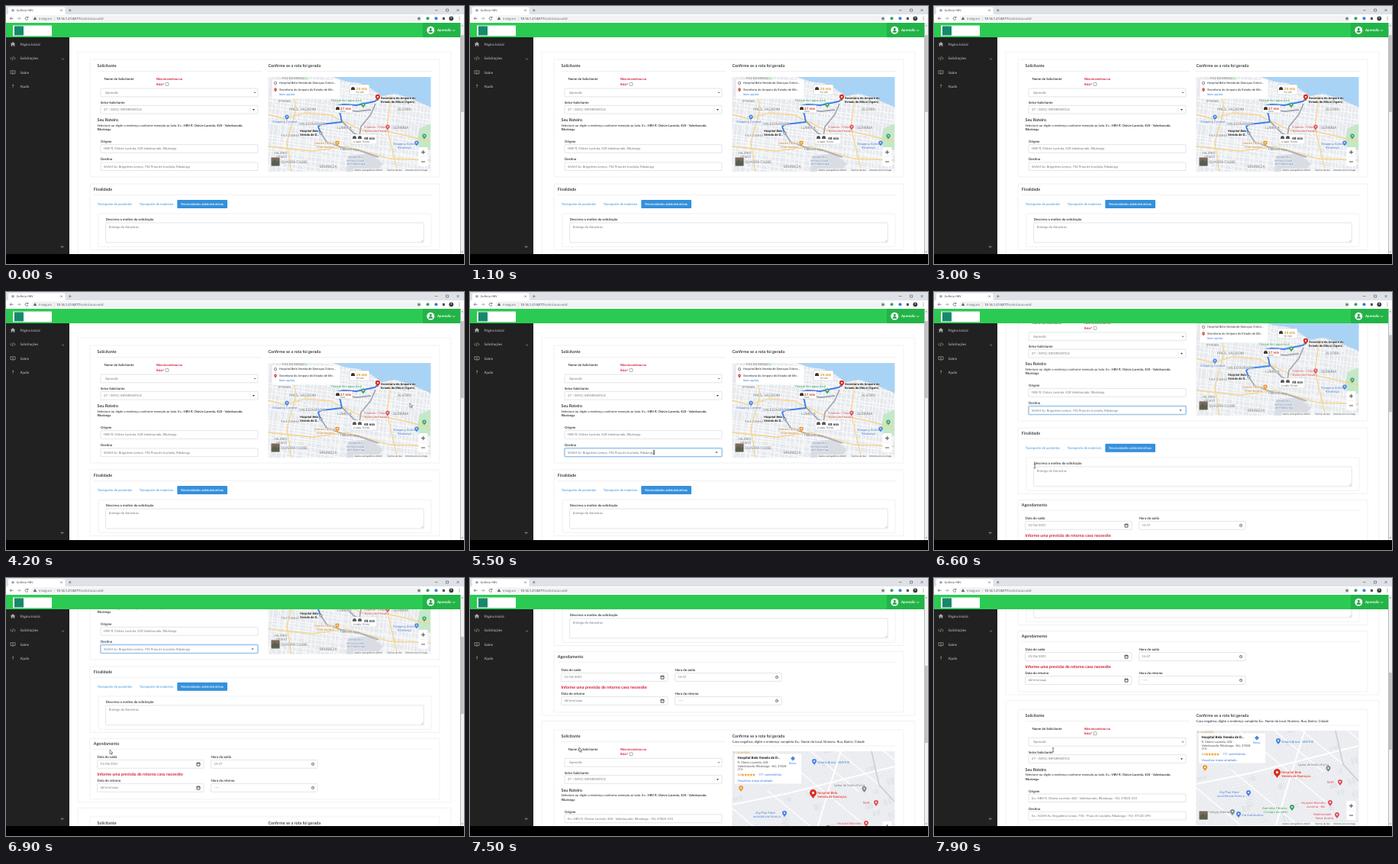
Write an HTML page that moves like this. It is 600 by 338 pixels and loops after 8 s.

```html
<!DOCTYPE html>
<html lang="pt-BR">
<head>
<meta charset="utf-8">
<title>Solicitação</title>
<style>
html, body { margin: 0; width: 100%; height: 100%; overflow: hidden; background: #000; }
#stage { display: block; width: 100vw; height: 100vh; }
text { font-family: Lato, "Open Sans", sans-serif; text-rendering: geometricPrecision; white-space: pre; }
.ui text { font-family: "Open Sans", Roboto, sans-serif; }
.map text { font-family: Roboto, Inter, sans-serif; }
.halo text { paint-order: stroke; stroke: #fff; stroke-width: .7px; stroke-linejoin: round; }

#page { animation: scroll 8s linear infinite; }
#thumb { animation: thumb 8s linear infinite; }
#pointer { animation: move 8s ease-in-out infinite; }
#arrow { animation: arrow 8s step-end infinite; }
#beam { animation: beam 8s step-end infinite; }
#focus { animation: focus 8s step-end infinite; }
#caret { animation: blink 1s step-end infinite; }

@keyframes scroll {
  0%, 78.75% { transform: translateY(0); }
  82.5% { transform: translateY(-55px); }
  86.25% { transform: translateY(-117px); }
  93.75% { transform: translateY(-231px); }
  96.25% { transform: translateY(-250px); }
  98.75%, 100% { transform: translateY(-258px); }
}
@keyframes thumb {
  0%, 78.75% { transform: translateY(0); }
  82.5% { transform: translateY(18.3px); }
  86.25% { transform: translateY(39px); }
  93.75% { transform: translateY(77px); }
  96.25% { transform: translateY(83.3px); }
  98.75%, 100% { transform: translateY(86px); }
}
@keyframes move {
  0%, 50% { transform: translate(598px, 130px); }
  58% { transform: translate(262px, 205px); }
  63%, 70% { transform: translate(241px, 210px); }
  78%, 82.5% { transform: translate(132px, 228px); }
  86.25% { transform: translate(136px, 225px); }
  93.75% { transform: translate(143px, 222px); }
  98.75%, 100% { transform: translate(156px, 225px); }
}
@keyframes arrow { 0% { opacity: 0; } 50% { opacity: 1; } 58% { opacity: 0; } 84% { opacity: 1; } 96.25%, 100% { opacity: 0; } }
@keyframes beam { 0% { opacity: 0; } 58% { opacity: 1; } 84% { opacity: 0; } 96.25%, 100% { opacity: 1; } }
@keyframes focus { 0% { opacity: 0; } 63.75%, 100% { opacity: 1; } }
@keyframes blink { 0% { opacity: 0; } 10% { opacity: 1; } 60%, 100% { opacity: 0; } }
</style>
</head>
<body>
<svg id="stage" viewBox="0 0 600 338" preserveAspectRatio="none"></svg>
<script>
const INK = '#24272b', GREY = '#75797f', BLUE = '#3490dc', RED = '#d0142c', LINE = '#e6e7e9';

// y is the vertical middle of the lowercase letters
const text = (x, y, s, size = 4.3, fill = INK, weight = 400, more = '') =>
  `<text x="${x}" y="${y + size * .33}" font-size="${size}" fill="${fill}" font-weight="${weight}" ${more}>${s}</text>`;
const label = (x, y, s) => text(x, y, s, 4.35, INK, 600);
const title = (x, y, s) => text(x, y, s, 5.4, INK, 600);
const rect = (x, y, w, h, fill, more = '') =>
  `<rect x="${x}" y="${y}" width="${w}" height="${h}" fill="${fill}" ${more}/>`;
const box = (x, y, w, h, color = LINE, r = 1) =>
  rect(x, y, w, h, '#fff', `stroke="${color}" stroke-width=".6" rx="${r}"`);
const line = (d, color, width = .6, more = '') =>
  `<path d="${d}" fill="none" stroke="${color}" stroke-width="${width}" ${more}/>`;
const shape = (d, fill) => `<path d="${d}" fill="${fill}"/>`;
const dot = (x, y, r, fill) => `<circle cx="${x}" cy="${y}" r="${r}" fill="${fill}"/>`;
const hr = (x1, x2, y) => line(`M${x1} ${y}H${x2}`, '#e2e3e5', .5);
const chevron = (x, y, color, s = 1.4) => line(`M${x - s} ${y - s / 2}l${s} ${s}l${s} ${-s}`, color, .8);
const caretDown = (x, y) => shape(`M${x - 1.6} ${y - .8}h3.2l-1.6 1.9z`, '#444');
const input = (x, y, w, s, h = 10.8) =>
  box(x, y, w, h, '#cfd3d8') + text(x + 4, y + 5.4, s, 4.2, GREY);

function rng(seed) {
  return () => (seed = (seed * 16807) % 2147483647) / 2147483647;
}

// Roughly parallel streets crossing a region, turned by an angle
function streets(cx, cy, reach, gap, angle, seed, color, width) {
  const rnd = rng(seed);
  let d = '';
  for (let v = -reach; v < reach; v += gap * (.6 + rnd() * .8)) {
    const a = -reach * (.3 + rnd() * .9), b = reach * (.3 + rnd() * .9);
    d += `M${a.toFixed(1)} ${v.toFixed(1)}L${b.toFixed(1)} ${(v + rnd() * 4 - 2).toFixed(1)}`;
  }
  return line(d, color, width, `transform="translate(${cx} ${cy}) rotate(${angle})"`);
}
const pin = (x, y, color, s = 1) =>
  shape(`M${x} ${y + 4 * s}C${x - s} ${y + 2 * s} ${x - 3 * s} ${y + s} ${x - 3 * s} ${y - s}a${3 * s} ${3 * s} 0 0 1 ${6 * s} 0C${x + 3 * s} ${y + s} ${x + s} ${y + 2 * s} ${x} ${y + 4 * s}z`, color) +
  dot(x, y - s, s, '#fff');
const notes = list => `<g class="halo">${list.map(n => text(...n)).join('')}</g>`;

function mapFrame(y, top, body) {
  const controls =
    rect(347, top + 105, 12, 12, '#7d6a5c', 'stroke="#fff" stroke-width=".7" rx="1"') +
    shape(`M348 ${top + 112}l4-4 3 3 3-2v7h-10z`, '#56604f') +
    rect(540.5, top + 92, 12, 25, '#fff', 'rx="1"') +
    line(`M544 ${top + 98.5}h5m-2.5-2.5v5M544 ${top + 111}h5`, '#555', 1) +
    line(`M542 ${top + 104.5}h9`, '#ddd', .4) +
    rect(455, top + 120, 101, 4, '#f6f7f8') +
    text(456.5, top + 122, 'Dados cartográficos ©2021', 3, '#444') +
    text(499, top + 122, 'Termos de Uso', 3, '#444') +
    text(523, top + 122, 'Informe erro no mapa', 3, '#444');
  return `<svg class="map" x="343.5" y="${y}" width="213" height="124" viewBox="343.5 ${top} 213 124">${body}${controls}</svg>`;
}

function routeMap() {
  const road = '#f6d58b', mid = '#6b7076', alt = '#a5a9b0';
  const chip = (x, y, w, h) => rect(x, y, w, h, '#fff', 'stroke="#bbb" stroke-width=".4" rx="1"');
  const car = (x, y, c) => shape(`M${x} ${y + 3}v-1.6l.9-2.2h3.2l.9 2.2v1.6z`, c);
  return mapFrame(93, 93,
    rect(343, 93, 214, 125, '#e6e9ed') +
    streets(450, 155, 130, 5, 8, 11, '#fff', .8) +
    streets(450, 155, 130, 5, 96, 23, '#fff', .8) +
    streets(450, 155, 130, 13, 48, 37, '#fbfbfc', .9) +
    shape('M542 160l14-6v34l-12 4-6-14z', '#c5e8c9') + shape('M378 93h16l4 6-14 4z', '#c5e8c9') +
    shape('M448 196l30-3 16 14-10 11h-38z', '#d9dde3') +
    line('M343 142l22 6 26-8 34 3 42 20 36 2 53 12M372 93l8 42-12 44 6 39M505 117l-6 42 14 59M343 184l58 6 46-6 56 16 53 2', road, 1.3) +
    shape('M428 93L446 99 463 101 478 108 492 118 510 115 530 121 557 133V93z', '#a9d3f5') +
    line('M413 167l7 11 22 8 20 3 26 9M441 152l14 14 8 4 2-12 13-16 6-14M440 136l20 2 18-2', alt, 1.8, 'stroke-linejoin="round"') +
    line('M412 166l-3-8 4-3 27-3-2-10-5-11 9-2 17 1 24-5 4-3', '#3f7fe8', 1.9, 'stroke-linejoin="round"') +
    notes([
      [362, 94.5, 'FOZ DO MIRUÁ', 4.2, mid], [371, 135, 'PRES. VALADIM', 4.9, mid],
      [384, 154, 'VALEDOURADO', 4.9, mid], [434, 159, 'LUMIRIA', 4.9, mid],
      [507, 159, 'SERIMBA', 4.9, mid], [513, 135, 'ALVORIL', 4.9, mid],
      [411, 210, 'BRUMEZA', 4.9, mid], [360, 204, 'QUADRA CLUBE', 4.9, mid],
      [352, 193, 'HILÁRIO', 4.4, mid], [354, 197.5, 'PRADO', 4.4, mid],
      [360, 170, 'VILA CUNHÃ', 4.2, mid], [437, 188, 'TIMBARÉ', 4.2, mid],
      [357, 125, 'IPOEMA', 4.4, mid],
      [426, 124, 'Parque da Lagoa Azul', 4.1, '#2f8f55'],
      [349, 152, 'Shopping Candeal', 4, '#3b6fc4'],
      [469, 159, 'Vitalmar - Clínica', 4, '#c2414b'], [470, 163.5, 'Bairro do Planalto', 4, '#c2414b'],
      [404, 180, 'Gomes Taveira', 4, '#b8732a'], [407, 184.5, 'Churrascaria', 4, '#b8732a'],
      [507, 181, 'Shopping Solária', 4, '#3b6fc4'], [513, 185.5, 'Ribalonga', 4, '#3b6fc4'],
      [449, 198, 'Aeroporto', 4, '#5f79a8'], [446, 202.5, 'Internacional', 4, '#5f79a8'], [447, 207, 'de Ribalonga', 4, '#5f79a8'],
      [385, 164, 'Hospital Bela', 4.1, '#222', 700], [385, 169, 'Vereda de D...', 4.1, '#222', 700],
      [491, 121, 'Secretaria do Amparo do', 4.1, '#222', 700], [491, 126, 'Estado de Miruá (Sgam)', 4.1, '#222', 700]
    ]) +
    pin(368, 146, '#4b84e0', .9) + pin(468, 130, '#38a169', .9) + pin(500, 159, '#e0525c', .9) +
    pin(434, 180, '#f0982e', .9) + pin(538, 180, '#4b84e0', .9) + pin(548, 171, '#38a169', .9) +
    dot(412.5, 166.5, 1.5, '#fff') + line('M411 166.5a1.5 1.5 0 1 0 3 0a1.5 1.5 0 1 0 -3 0', '#222', .6) +
    pin(487, 120, '#d93025', 1.05) +
    chip(450, 103, 26, 13) + car(452, 107, '#333') + text(459, 108, '24 min', 4.6, '#e39a1b', 700) + text(459, 113, '8,1 km', 3.3, '#555') +
    chip(430, 130, 24, 10) + car(432, 133, '#333') + text(438, 134, '27 min', 4.6, '#d2452f', 700) + text(438, 138, '9 km', 3, '#555') +
    chip(452, 168, 34, 13) + car(454, 171, '#555') + car(461, 171, '#555') + text(469, 173, '48 min', 4.6, '#222', 700) + text(455, 178.3, 'a cada 15 min', 3.4, '#555') +
    rect(348.5, 96.5, 89, 25, '#fff', 'rx="1"') +
    line('M351.3 101a1.7 1.7 0 1 0 3.4 0a1.7 1.7 0 1 0 -3.4 0', '#444', .6) + line('M353 104v3', '#999', .5, 'stroke-dasharray=".6 .6"') +
    pin(353, 110, '#d93025', .6) +
    text(358, 101, 'Hospital Bela Vereda de Doenças Crônic...', 4, '#333') +
    text(358, 110, 'Secretaria do Amparo do Estado de Mir...', 4, '#333') +
    text(358, 116, 'Mais opções', 3.6, '#3b78e7'));
}

function placeMap() {
  const rnd = rng(91), blue = '#3b6fc4', red = '#c2414b';
  let blocks = '';
  for (let i = 0; i < 26; i++) blocks += rect(345 + rnd() * 205, 202 + rnd() * 118, 5 + rnd() * 8, 4 + rnd() * 6, '#e2e5ea', `transform="rotate(-14 450 262)"`);
  const stars = [0, 1, 2, 3, 4].map(i => {
    const x = 357.5 + i * 3.6;
    return shape(`M${x} 229l.6 1.3 1.3.1-1 .9.3 1.4-1.2-.7-1.2.7.3-1.4-1-.9 1.3-.1z`, '#f0a11e');
  }).join('');
  return mapFrame(458, 200,
    rect(343, 200, 214, 125, '#ebedf1') + blocks +
    streets(450, 262, 135, 8, -14, 5, '#cfd4db', 1.2) + streets(450, 262, 135, 8, -14, 5, '#fff', .8) +
    streets(450, 262, 135, 9, 74, 17, '#cfd4db', 1.2) + streets(450, 262, 135, 9, 74, 17, '#fff', .8) +
    streets(450, 262, 135, 34, 40, 29, '#fff', 1.3) +
    line('M343 270l70-14 143-36M486 200l-16 50-22 74', '#fff', 2) +
    line('M526 200l10 44 20 22', '#c9ced6', 1.6) +
    notes([
      [345, 202, 'R. ALAMEDA', 3.8, '#c08a35'],
      [455, 214.7, 'Selaria Brava - MATRIZ', 4.2, blue],
      [477, 244.5, 'Igreja de Santa Alvina', 4.2, '#63707c'],
      [515, 268, 'NUR', 4.4, red],
      [374, 281, 'Zig.Play Store', 4.2, blue], [371, 285.5, 'assistência técnica', 4.2, blue],
      [430, 302, 'Areninha Tibúrcio', 4.2, '#2f8f55'], [432, 306.5, '(Campo do Vale)', 4.2, '#2f8f55'],
      [481, 295, 'Hospital Marcelo', 4.2, red], [488, 299.5, 'Juruena - MJ', 4.2, red],
      [359, 307, 'Colégio Aldenor', 4.2, '#63707c'],
      [403, 310.5, 'Via Automotiva', 4.2, blue],
      [497, 310, 'Maternidade', 4.2, red], [500, 314.5, 'Nova Aurora', 4.2, red],
      [455, 254.3, 'Hospital Bela', 4.4, '#d93025', 500], [455, 259.3, 'Vereda de Doenças...', 4.4, '#d93025', 500]
    ]) +
    pin(451, 214, '#4b84e0') + pin(516.5, 250, '#7b8a97') + pin(532, 268, '#e0525c') +
    pin(412, 282, '#4b84e0') + pin(469, 301, '#38a169') + pin(519, 295, '#e0525c') +
    pin(391, 307, '#7b8a97') + pin(399, 310, '#4b84e0') + pin(528, 311, '#e0525c') + pin(355, 249, '#f0982e') +
    pin(449.5, 256, '#d93025', 1.5) +
    rect(347, 203.5, 87, 39, '#fff', 'rx="1"') +
    text(350.5, 209, 'Hospital Bela Vereda de D...', 4.5, '#222', 700) +
    text(350.5, 214.7, 'R. Otávio Lacerda, 428 -', 4, '#555') +
    text(350.5, 219.4, 'Valedourado, Ribalonga - MJ, 47820-', 4, '#555') +
    text(350.5, 224, '315', 4, '#555') +
    text(350.5, 231, '4,4', 4, '#c9751a') + stars +
    text(378, 231, '171 comentários', 4, '#3b78e7') +
    text(350.5, 239, 'Visualizar mapa ampliado', 4, '#3b78e7') +
    shape('M423 206.5l3 3-3 3-3-3z', '#4b84e0') +
    text(422.7, 216.2, 'Rotas', 3.6, '#3b78e7', 400, 'text-anchor="middle"'));
}

const form = (from, to) =>
  title(119.5, 78.5, 'Solicitante') +
  label(128.5, 96, 'Nome do Solicitante') +
  text(197, 96, 'Não encontrou na', 4.25, RED, 700) + text(197, 102.7, 'lista?', 4.25, RED, 700) +
  box(209, 100.4, 4, 4, '#777', .6) +
  input(124, 108, 206, '') + text(130, 113.6, 'Aprendiz', 4.3, GREY) + chevron(326, 113.4, '#444', 1.2) +
  label(124, 127, 'Setor Solicitante') +
  input(124, 130.3, 206, '27 - (NTIC) INFORMATICA') + line('M319.7 132v7.5', '#ddd', .5) + caretDown(324.4, 135.8) +
  title(119.5, 149.7, 'Seu Roteiro') +
  text(119.5, 156.5, 'Selecione ou digite o endereço conforme exemplo ao lado. Ex.: <tspan font-weight="600">HBV R. Otávio Lacerda, 428 - Valedourado,</tspan>', 4.1) +
  text(119.5, 162, 'Ribalonga', 4.1, INK, 600) +
  label(124, 178, 'Origem') + input(124, 181.6, 206, from) +
  label(124, 201, 'Destino') + input(124, 204.8, 206, to);

const field = (x, y, name, value, icon) =>
  label(x, y, name) + input(x, y + 3.6, 139.5, value) +
  (icon === 'date'
    ? line(`M${x + 130.5} ${y + 7.2}h4v4h-4zM${x + 130.5} ${y + 8}h4`, '#333', .8)
    : line(`M${x + 131.7} ${y + 9}a1.7 1.7 0 1 0 3.4 0a1.7 1.7 0 1 0 -3.4 0M${x + 133.4} ${y + 8}v1.1h.8`, '#444', .6));

const page =
  rect(83, 22, 512.5, 700, '#fff') +
  box(94, 60, 489, 351) + box(110, 70, 458, 154) +
  hr(119.5, 335, 85.5) + hr(343.5, 558, 85.5) +
  form('HBV R. Otávio Lacerda, 428 Valedourado, Ribalonga', 'SGAM Av. Brigadeiro Lemos, 750 Praia de Jurubela, Ribalonga') +
  `<g id="focus">${rect(123.6, 204.4, 206.8, 11.6, 'none', 'stroke="#cfe4f6" stroke-width="1.6" rx="1.4"')}
   ${rect(124, 204.8, 206, 10.8, 'none', 'stroke="#6fb1e6" stroke-width=".7" rx="1"')}${caretDown(323, 210.2)}
   <g id="caret">${line('M241.2 207.6v5.2', '#222', .5)}</g></g>` +
  title(343.5, 78.5, 'Confirme se a rota foi gerada') + routeMap() +

  box(110, 233, 458, 86.5) + title(114.8, 240.5, 'Finalidade') + hr(114.8, 558, 247.5) +
  text(119.7, 259.6, 'Transporte de pacientes', 4.35, BLUE) + text(174.7, 259.6, 'Transporte de materiais', 4.35, BLUE) +
  rect(224.3, 254, 65.7, 11, BLUE, 'rx="1"') + text(229.3, 259.6, 'Necessidades administrativas', 4.3, '#fff', 600) +
  box(121, 272, 436, 43.3) + label(130.7, 280, 'Descreva o motivo da solicitação') +
  box(130.7, 284, 416.5, 25.8, '#cfd3d8') + text(134.8, 290, 'Entrega de Amostras', 4.3, GREY) +
  line('M544 309l2.6-2.6M545.5 309l1.1-1.1', '#888', .4) +

  box(110, 327.5, 458, 79.5) + title(114.8, 334.3, 'Agendamento') + hr(114.8, 558, 341.3) +
  field(119.5, 352, 'Data do saída', '01/06/2021', 'date') + field(268.6, 352, 'Hora do saída', '15:47', 'time') +
  text(119.5, 374.4, 'Informe uma previsão de retorno caso necessite', 5.3, RED, 700) +
  field(119.5, 383, 'Data do retorno', 'dd/mm/aaaa', 'date') + field(268.6, 383, 'Hora do retorno', '--:--', 'time') +

  box(94, 418.5, 489, 300) + box(110, 430, 458, 200) +
  `<g transform="translate(0 359.3)">${form('Ex.: HBV R. Otávio Lacerda, 428 - Valedourado, Ribalonga - MJ, 47820-315',
    'Ex.: SGAM Av. Brigadeiro Lemos, 750 - Praia de Jurubela, Ribalonga - MJ, 47120-290')}</g>` +
  title(343.5, 438.4, 'Confirme se a rota foi gerada') +
  text(343.5, 445.6, 'Caso negativo, digite o endereço completo Ex.: Nome do local, Número, Rua, Bairro, Cidade', 4.35) +
  hr(119.5, 335, 445.5) + hr(343.5, 558, 451) + placeMap();

const menu = [['Página Inicial', 50], ['Solicitações', 68.6], ['Sobre', 87], ['Ajuda', 105.5]]
  .map(([s, y]) => text(18.5, y, s, 4.6, '#c9cbce')).join('');

const sidebar =
  rect(0, 41, 83, 284, '#212121') + menu +
  shape('M9 47l3.2 3h-.9v2.8h-1.6v-1.8h-1.4v1.8H6.700v-2.8h-.9z', '#aaa') +
  line('M7.300 67l-1.600 1.600 1.600 1.600M10.700 67l1.600 1.600-1.600 1.600M9.600 66.300l-1.200 4.600', '#aaa', .7) +
  line('M9 85.200v4.200M9 85.200c-1-.7-2-.8-3-.5v4c1-.3 2-.2 3 .5 1-.7 2-.8 3-.5v-4c-1-.3-2-.2-3 .5', '#aaa', .7) +
  text(7.700, 105.5, '?', 5.6, '#bbb', 700) +
  chevron(74.5, 69.5, '#aaa', 1.3) + line('M76.200 315.500h-4m1.600-1.600l-1.600 1.600 1.600 1.600', '#aaa', .6);

const header =
  rect(0, 22, 595.5, 19, '#2bca53') + rect(546, 22, 49.5, 19, '#22b447') +
  rect(9, 25.5, 51, 13.8, '#fff') + rect(11, 26.4, 12, 12, '#16896b') +
  dot(556.3, 31.7, 5, '#fff') + dot(556.3, 30.3, 1.5, '#2a9c4a') + shape('M553.500 34.800c0-3.600 5.600-3.600 5.600 0z', '#2a9c4a') +
  text(565, 32, 'Aprendiz', 4.5, '#fff', 700) + chevron(586.5, 32, '#fff', 1.6);

const chrome = `<g class="ui">` +
  rect(0, 0, 600, 11.5, '#dee1e6') + shape('M1 11.500q2 0 2-2V3q0-1.500 1.500-1.500H76q1.500 0 1.500 1.500v6.500q0 2 2 2z', '#fff') +
  dot(9, 5.8, 1.8, '#8fa6bd') + text(13.5, 5.8, 'GoRota HBV', 3.9, '#444') +
  line('M71.300 4.500l2.400 2.400m0-2.400l-2.400 2.400M82 5.700h3.600m-1.800-1.800v3.600', '#555', .6) +
  line('M562 5.500h3.400M576.500 4h3v3h-3zM590.500 4l3 3m0-3l-3 3', '#333', .5) +
  rect(0, 11, 600, 11, '#fff') + rect(33, 12.2, 512, 8.600, '#f1f3f4', 'rx="4.300"') +
  line('M9.500 16.300H5.300m1.800-1.900l-1.900 1.900 1.900 1.900', '#555', .7) +
  line('M14.700 16.300h4.200m-1.800-1.900l1.900 1.900-1.900 1.900', '#999', .7) +
  line('M28.800 15.200a2 2 0 1 0 .2 1.800M29 13.800v1.700h-1.700', '#555', .7) +
  shape('M38 14l2.300 4h-4.600z', '#666') +
  text(43, 16.3, 'Inseguro', 4.2, '#666') + line('M63.500 14v4.500', '#bbb', .4) +
  text(66, 16.3, '10.14.1.21:8277<tspan fill="#666">/solicitacao-add</tspan>', 4.2, '#222') +
  shape('M541 13.800l.8 1.700 1.800.2-1.300 1.200.4 1.800-1.700-.9-1.700.9.4-1.800-1.300-1.200 1.800-.2z', '#777') +
  dot(552.5, 16.3, 2, '#37a05c') + dot(563.5, 16.3, 2, '#3f78d8') + rect(571.8, 14.8, 3.2, 3.2, '#555', 'rx=".6"') +
  dot(583.3, 16.3, 2.9, '#37393d') + dot(583.3, 15.5, 1, '#b9a79a') +
  [14.5, 16.3, 18.1].map(y => dot(594, y, .5, '#555')).join('') + `</g>`;

const scrollbar =
  rect(595.5, 22, 4.5, 303, '#f1f1f1') +
  shape('M596.700 26.300l1.100-1.500 1.100 1.500zM596.700 321.500l1.100 1.500 1.100-1.500z', '#777') +
  `<g id="thumb">${rect(595.8, 38, 3.9, 101, '#c1c1c1')}</g>`;

const pointer = `<g id="pointer">
  <g id="arrow"><path d="M0 0v5.600l1.300-1.200.9 2 .9-.4-.9-1.900h1.800z" fill="#fff" stroke="#222" stroke-width=".5"/></g>
  <g id="beam">${line('M-1.200-2.600h.8l.4.400.400-.4h.8M0-2.200v4.600M-1.200 2.800h.8l.4-.4.4.4h.8', '#222', .6)}</g></g>`;

document.getElementById('stage').innerHTML =
  rect(0, 0, 600, 338, '#000') +
  `<svg x="0" y="22" width="600" height="303" viewBox="0 22 600 303"><g id="page">${page}</g></svg>` +
  sidebar + header + scrollbar + chrome + pointer;
</script>
</body>
</html>
```
